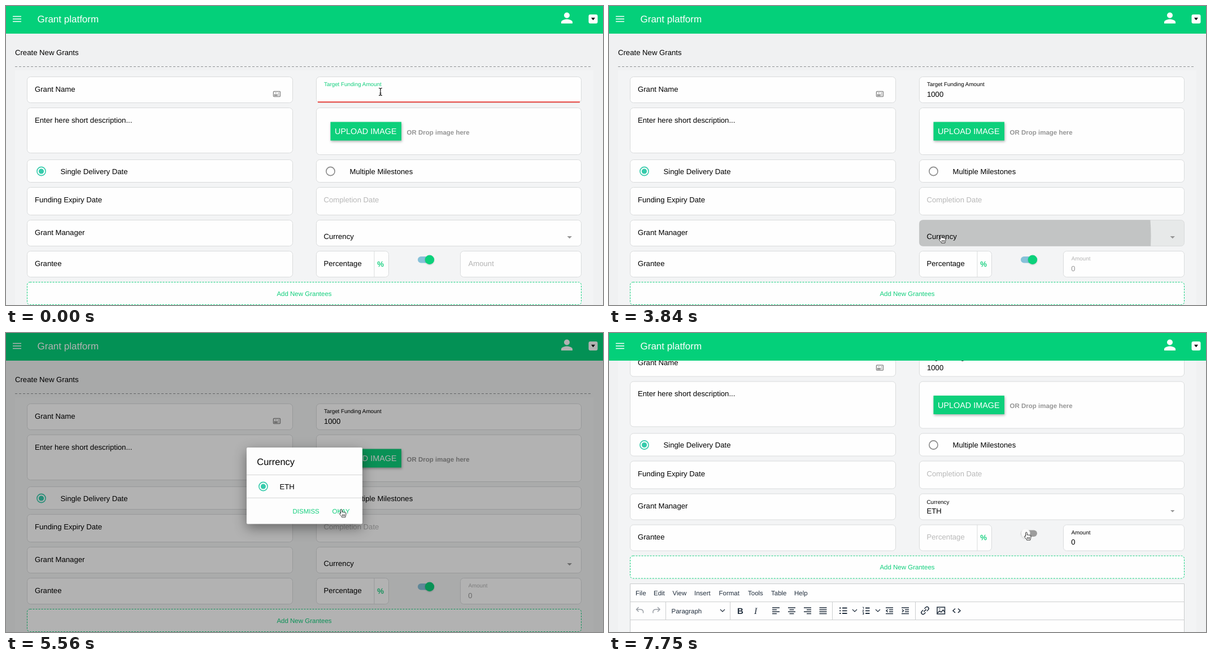
Write an HTML page that moves like this. It is 1057 px wide and 530 px high and loops after 8000 ms.

```html
<!DOCTYPE html>
<html lang="en">
<head>
<meta charset="utf-8">
<title>Create New Grants</title>
<style>
html, body { margin: 0; width: 100%; height: 100%; overflow: hidden; background: #f0f1f2; }
svg { display: block; width: 1057px; height: 530px; font: 13.15px "Liberation Sans", Arial, sans-serif; text-rendering: geometricPrecision; }
text { white-space: pre; }
.field { fill: #fefefe; stroke: #d9dbdc; rx: 6px; }
.small { font-size: 9.86px; }
.mid { font-size: 11.5px; }
.faint { fill: #b8b8b8; }
.green { fill: #12cf7d; }
.teal { fill: #36cbab; }
.ring { fill: none; stroke-width: 1.6; }
.icons { fill: none; stroke: #222f3e; stroke-width: 1.5; }

/* 8 s loop: 1% = 80 ms */
.step { animation: 8s step-end infinite; }
.move { animation: 8s linear infinite; }

#typed { animation-name: typed; }
@keyframes typed {
  0% { clip-path: inset(0 100% 0 0); }
  3.7% { clip-path: inset(0 75% 0 0); }
  7.35% { clip-path: inset(0 50% 0 0); }
  9.6% { clip-path: inset(0 25% 0 0); }
  12.85%, 100% { clip-path: inset(0 0 0 0); }
}
#caret { animation-name: caret, blink; }
@keyframes caret {
  0% { transform: translateX(7.31px); }
  7.35% { transform: translateX(14.62px); }
  9.6% { transform: translateX(21.93px); }
  12.85%, 100% { transform: translateX(29.24px); }
}
@keyframes blink {
  0%, 19.6%, 33%, 44.6%, 100% { opacity: 0; }
  3.7%, 26.35%, 39.7% { opacity: 1; }
}
#underline { animation-name: underline; }
@keyframes underline {
  0% { stroke: #ea4640; }
  3.7% { stroke: #82c22e; }
  44.6%, 100% { stroke: transparent; }
}
#target { animation-name: target; }
@keyframes target { 0% { fill: #12cf7d; } 44.6%, 100% { fill: #000; } }

#amount { animation-name: amount, wake; animation-timing-function: ease-out, step-end; }
@keyframes amount {
  0%, 3% { transform: translate(818.5px, 460.7px); }
  5.6%, 100% { transform: translate(818.5px, 451px) scale(.75); }
}
@keyframes wake { 0% { fill: #b4b4b4; } 94.2%, 100% { fill: #000; } }
#zero { animation-name: zero; }
@keyframes zero {
  0% { fill: transparent; }
  3.7% { fill: #999; }
  94.2%, 100% { fill: #000; }
}
#percent { animation-name: percent; }
@keyframes percent { 0% { fill: #000; } 94.2%, 100% { fill: #b8b8b8; } }
#track { animation-name: track; }
@keyframes track { 0%, 93.8% { fill: #86c1d9; } 96.5%, 100% { fill: #9c9c9c; } }
#knob { animation-name: knob; }
@keyframes knob {
  0%, 93.8% { transform: none; fill: #0bd17b; }
  96.5%, 100% { transform: translateX(-12.5px); fill: #fafafa; }
}

#currency { animation-name: currency; }
@keyframes currency {
  0%, 54.7%, 86%, 100% { fill: #fefefe; }
  40.75%, 83.7% { fill: #e7e9e9; }
}
#multiple { animation-name: multiple; }
@keyframes multiple { 0%, 83.7%, 100% { fill: #fefefe; } 75.7% { fill: #e8eaea; } }
#ripple { animation-name: ripple; }
@keyframes ripple {
  0%, 44.6% { r: 0; opacity: .16; }
  48% { r: 371px; opacity: .16; }
  49.5% { r: 435px; opacity: .14; }
  52.5%, 100% { r: 435px; opacity: 0; }
}
.empty { animation-name: before; }
.chosen { animation-name: after; }
@keyframes before { 0% { opacity: 1; } 73.1%, 100% { opacity: 0; } }
@keyframes after { 0% { opacity: 0; } 73.1%, 100% { opacity: 1; } }

#shade { animation-name: shade; }
@keyframes shade {
  0%, 49.5%, 75.5%, 100% { opacity: 0; }
  52.8%, 72.9% { opacity: .3; }
  73.1% { opacity: .03; }
}
#modal { animation-name: modal; transform-origin: 528.5px 271px; }
@keyframes modal {
  0%, 49.8% { opacity: 0; transform: scale(.9); }
  52.8%, 72.9% { opacity: 1; transform: none; }
  73.1% { opacity: .18; transform: none; }
  75.5%, 100% { opacity: 0; transform: none; }
}
#card { fill: #fdfdfd; filter: drop-shadow(0 7px 11px rgba(0, 0, 0, .42)); }
#option { animation-name: option; }
@keyframes option { 0%, 61.5% { stroke: #707070; } 63%, 100% { stroke: #36cbab; } }
#dot { animation-name: dot; }
@keyframes dot { 0%, 61.5% { r: 0; } 63.8%, 100% { r: 4.5px; } }
#press { animation-name: press; }
@keyframes press { 0% { opacity: 0; } 73%, 100% { opacity: .25; } }

#page { animation-name: scroll; --far: -94.5px; --near: -90.5px; }
@keyframes scroll {
  0%, 77.6% { transform: none; }
  78.375% { transform: translateY(-18px); }
  79.6% { transform: translateY(-62px); }
  80.875%, 82.3% { transform: translateY(-90.5px); }
  84%, 100% { transform: translateY(-94.5px); }
}
#bar { animation-name: bar, barFade; }
@keyframes bar {
  0%, 77.6% { transform: none; }
  78.375% { transform: translateY(10px); }
  79.6% { transform: translateY(35px); }
  80.875%, 82.3% { transform: translateY(51.5px); }
  84%, 100% { transform: translateY(54px); }
}
@keyframes barFade {
  0%, 77.6%, 90.8%, 100% { opacity: 0; }
  78.3%, 88.4% { opacity: 1; }
}

#mouse { animation-name: mouse; animation-timing-function: ease-in-out; }
@keyframes mouse {
  0%, 25.8% { transform: translate(663px, 152px); }
  34.375%, 37% { transform: translate(588px, 335px); }
  42.375%, 54% { transform: translate(588px, 406px); }
  56.6%, 59.5% { transform: translate(512px, 269.5px); }
  63%, 64.5% { transform: translate(515px, 277px); }
  69.5%, 83% { transform: translate(594px, 312.5px); }
  90.5%, 100% { transform: translate(739px, 353px); }
}
#beam { animation-name: beam; }
#arrow { animation-name: arrow; }
#hand { animation-name: hand; }
@keyframes beam { 0% { opacity: 1; } 28%, 100% { opacity: 0; } }
@keyframes arrow { 0%, 40.75%, 100% { opacity: 0; } 28% { opacity: 1; } }
@keyframes hand { 0% { opacity: 0; } 40.75%, 100% { opacity: 1; } }
</style>
</head>
<body>
<svg viewBox="0 0 1057 530">
  <defs>
    <clipPath id="currencyClip"><rect x="549.5" y="379.5" width="469" height="46" rx="6"/></clipPath>
    <path id="chevron" d="M-4 -2l4 4 4-4" stroke-width="1.2"/>
  </defs>
  <rect width="1057" height="530" fill="#f0f1f2"/>

  <g id="page" class="move">
    <rect x="16" y="114" width="1024" height="600" fill="#f3f4f5"/>
    <text x="16" y="87.4">Create New Grants</text>
    <path d="M16 107.5H1038" stroke="#8e9194" stroke-dasharray="4 3"/>

    <rect class="field" x="37.5" y="125.5" width="470" height="46"/>
    <text x="51" y="151.6">Grant Name</text>
    <g fill="none" stroke="#8f8f8f" stroke-width="1.5">
      <rect x="473.5" y="151.5" width="12" height="9" rx="1"/>
      <path d="M481 154.5h3M481 157.5h3" stroke-width="1.2"/>
      <path d="M475.5 158.5h4.5v-1.2h-4.5zM477 154.3h1.6" stroke-width="1.4"/>
    </g>

    <rect class="field" x="549.5" y="125.5" width="469" height="46"/>
    <text id="target" class="small step" x="563" y="142">Target Funding Amount</text>
    <text id="typed" class="step" x="563" y="160.6">1000</text>
    <path id="caret" class="step" d="M563.5 149.5v14.5" stroke="#000"/>
    <path id="underline" class="step" d="M552 170.2H1016" stroke-width="2"/>

    <rect class="field" x="37.5" y="180.5" width="470" height="80"/>
    <text x="51" y="206.6">Enter here short description...</text>
    <rect class="field" x="549.5" y="180.5" width="469" height="83"/>
    <rect x="574.5" y="205.5" width="125.5" height="33" fill="#0dd07b" style="filter:drop-shadow(1px 2px 2px rgba(0,0,0,.3))"/>
    <text x="582" y="227.2" font-size="14.4" fill="#fff">UPLOAD IMAGE</text>
    <text class="mid" x="709.5" y="227.8" font-weight="bold" fill="#969696">OR Drop image here</text>

    <rect class="field" x="37.5" y="272.5" width="470" height="40"/>
    <circle class="ring" cx="62.5" cy="293" r="7.6" stroke="#36cbab"/>
    <circle class="teal" cx="62.5" cy="293" r="4.6"/>
    <text x="96.5" y="297.8">Single Delivery Date</text>
    <rect id="multiple" class="field step" x="549.5" y="272.5" width="469" height="40"/>
    <circle class="ring" cx="574.5" cy="293" r="7.6" stroke="#8a8a8a"/>
    <text x="608.5" y="297.8">Multiple Milestones</text>

    <rect class="field" x="37.5" y="321.5" width="470" height="49"/>
    <text x="51" y="348">Funding Expiry Date</text>
    <rect class="field" x="549.5" y="321.5" width="469" height="49"/>
    <text class="faint" x="562.5" y="348">Completion Date</text>

    <rect class="field" x="37.5" y="379.5" width="470" height="46"/>
    <text x="51" y="405.8">Grant Manager</text>
    <rect id="currency" class="field step" x="549.5" y="379.5" width="469" height="46"/>
    <g clip-path="url(#currencyClip)"><circle id="ripple" class="move" cx="588" cy="408" r="0"/></g>
    <text class="empty step" x="562.5" y="412.8">Currency</text>
    <g class="chosen step">
      <text class="small" x="562.5" y="397">Currency</text>
      <text x="562.5" y="414.4">ETH</text>
    </g>
    <path d="M993.5 408h8.5l-4.2 4.3z" fill="#979797"/>

    <rect class="field" x="37.5" y="434.5" width="470" height="46"/>
    <text x="51" y="460.8">Grantee</text>
    <rect class="field" x="549.5" y="434.5" width="128" height="46"/>
    <path d="M652 434.5v46" stroke="#d9dbdc"/>
    <text id="percent" class="step" x="562.5" y="460.8">Percentage</text>
    <text class="green" x="657.2" y="461.8" stroke="#12cf7d" stroke-width=".3">%</text>
    <rect id="track" class="move" x="729" y="444" width="29" height="11.5" rx="5.75"/>
    <circle id="knob" class="move" cx="750" cy="449.8" r="8.2" style="filter:drop-shadow(0 1px 1px rgba(0,0,0,.18))"/>
    <rect class="field" x="804.5" y="434.5" width="214" height="46"/>
    <text id="amount" class="move">Amount</text>
    <text id="zero" class="step" x="818.3" y="469.6">0</text>

    <rect x="37.5" y="489.5" width="981" height="40" rx="5" fill="#fefefe" stroke="#12cf7d" stroke-dasharray="3 2"/>
    <text class="mid green" x="528" y="513.8" text-anchor="middle">Add New Grantees</text>

    <g transform="translate(0 94.5)">
      <path d="M37.5 560V444.5H1018.5V560" fill="#fefefe" stroke="#c9cbcd"/>
      <path d="M37.5 476.5H1018.5M37.5 508.5H1018.5M100.5 476.5v32M214.5 476.5v32M395.5 476.5v32M542.5 476.5v32" stroke="#cccecf"/>
      <g class="mid" fill="#222f3e">
        <text x="47" y="465.2">File</text>
        <text x="79" y="465.2">Edit</text>
        <text x="112.5" y="465.2">View</text>
        <text x="151" y="465.2">Insert</text>
        <text x="194.5" y="465.2">Format</text>
        <text x="246" y="465.2">Tools</text>
        <text x="287" y="465.2">Table</text>
        <text x="328" y="465.2">Help</text>
        <text x="110.5" y="497">Paragraph</text>
        <text x="227" y="497.5" font-size="15" font-weight="bold">B</text>
        <text x="257" y="497.5" font-size="16" font-style="italic" font-family="Liberation Serif, serif">I</text>
      </g>
      <g class="icons">
        <g stroke="#9a9fa6">
          <path d="M52.5 486l-4 4 4 4M49 490h7c4 0 5 3 4.500 6.500"/>
          <path d="M86 486l4 4-4 4M89.500 490h-7c-4 0-5 3-4.500 6.500"/>
        </g>
        <use href="#chevron" x="201" y="492"/>
        <use href="#chevron" x="435" y="492"/>
        <use href="#chevron" x="476" y="492"/>
        <path d="M289 487h13M289 490.500h8M289 494h13M289 497.500h8"/>
        <path d="M317 487h13M319.500 490.500h8M317 494h13M319.500 497.500h8"/>
        <path d="M345 487h13M350 490.500h8M345 494h13M350 497.500h8"/>
        <path d="M372.500 487h13M372.500 490.500h13M372.500 494h13M372.500 497.500h13"/>
        <path d="M413 487.500h8.500M413 492.300h8.500M413 497h8.500M408 487.500h2.500M408 492.300h2.500M408 497h2.500" stroke-width="1.8"/>
        <path d="M454 487.500h7.500M454 492.300h7.500M454 497h7.500" stroke-width="1.8"/>
        <path d="M449 486h1.500v3M449 491h2l-2 2.500h2M449 495.500h2v3h-2M449.500 497h1.500" stroke-width=".9"/>
        <path d="M490 487h13M496 490.500h7M496 494h7M490 497.500h13M493.500 490l-2.500 2.300 2.500 2.300"/>
        <path d="M518 487h13M524 490.500h7M524 494h7M518 497.500h13M519 490l2.500 2.300-2.500 2.300"/>
        <g transform="rotate(-45 559.5 492)">
          <path d="M558 489h-3.500a3 3 0 0 0 0 6h3.500M561 489h3.500a3 3 0 0 1 0 6h-3.500M556.500 492h6"/>
        </g>
        <rect x="581" y="486" width="13.500" height="12"/>
        <path d="M581 497l4.500-4.500 2.500 2.500 3.500-4 3 3.500M584.500 489h2"/>
        <path d="M613 488.500l-4 3.700 4 3.700M618 488.500l4 3.700-4 3.700"/>
      </g>
    </g>
  </g>

  <rect id="bar" class="move" x="1051.500" y="49" width="7" height="296" rx="2.500" fill="#6f7172"/>

  <rect width="1057" height="49" fill="#04d07a"/>
  <path d="M12 18.500h15M12 23h15M12 27.500h15" stroke="#fff" stroke-width="1.700"/>
  <text x="55.500" y="29.200" font-size="17" fill="#fff">Grant platform</text>
  <g fill="#fff">
    <circle cx="993" cy="16.500" r="5"/>
    <path d="M983 31v-2.500c0-3.300 6.700-5 10-5s10 1.700 10 5V31z"/>
    <rect x="1031.500" y="15" width="16" height="16" rx="3"/>
  </g>
  <path d="M1036 20.800h7l-3.500 4.400z"/>

  <rect id="shade" class="move" width="1057" height="530"/>
  <g id="modal" class="move">
    <rect id="card" x="426" y="203" width="205" height="135.500" rx="2"/>
    <text x="444.300" y="234.400" font-size="16.440">Currency</text>
    <path d="M426 251.500h205M426 292.300h205" stroke="#d5d6d6"/>
    <circle id="option" class="ring move" cx="455.500" cy="272" r="7.600"/>
    <circle id="dot" class="teal move" cx="455.500" cy="272" r="0"/>
    <text x="484.500" y="276.500">ETH</text>
    <rect id="press" class="teal step" x="571" y="303" width="46" height="25" rx="2"/>
    <text class="mid green" x="507.500" y="319.800">DISMISS</text>
    <text class="mid green" x="577.500" y="319.800">OKAY</text>
  </g>

  <g id="mouse" class="move">
    <g id="beam" class="step" fill="none">
      <path id="bar-shape" d="M-3 -6.500q3 0 3 2V4.500q0 2-3 2M3 -6.500q-3 0-3 2M0 4.500q0 2 3 2M-1.500 2.500h3" stroke="#111" stroke-width="1.200"/>
    </g>
    <path id="arrow" class="step" d="M.5 .5v13l3-2.800 2 4.500 2-.9-2-4.300h4z" stroke="#fff" stroke-width=".8"/>
    <path id="hand" class="step" d="M-1.400 1.400c0-1.600 2.600-1.600 2.600 0V5.200c.6-.9 2.200-.8 2.400.3.600-.8 2-.6 2.200.4.700-.7 2.100-.3 2.100.9V9.500c0 1.600-1 2.400-1 4.500H.6C.3 12-2 10.500-3.400 8.600c-.8-1.300.6-2.200 1.600-1.300l.4.400zM1.500 9v3M3.500 9v3M5.500 9v3" fill="#fff" stroke="#111" stroke-width=".9"/>
  </g>
</svg>
</body>
</html>
```
